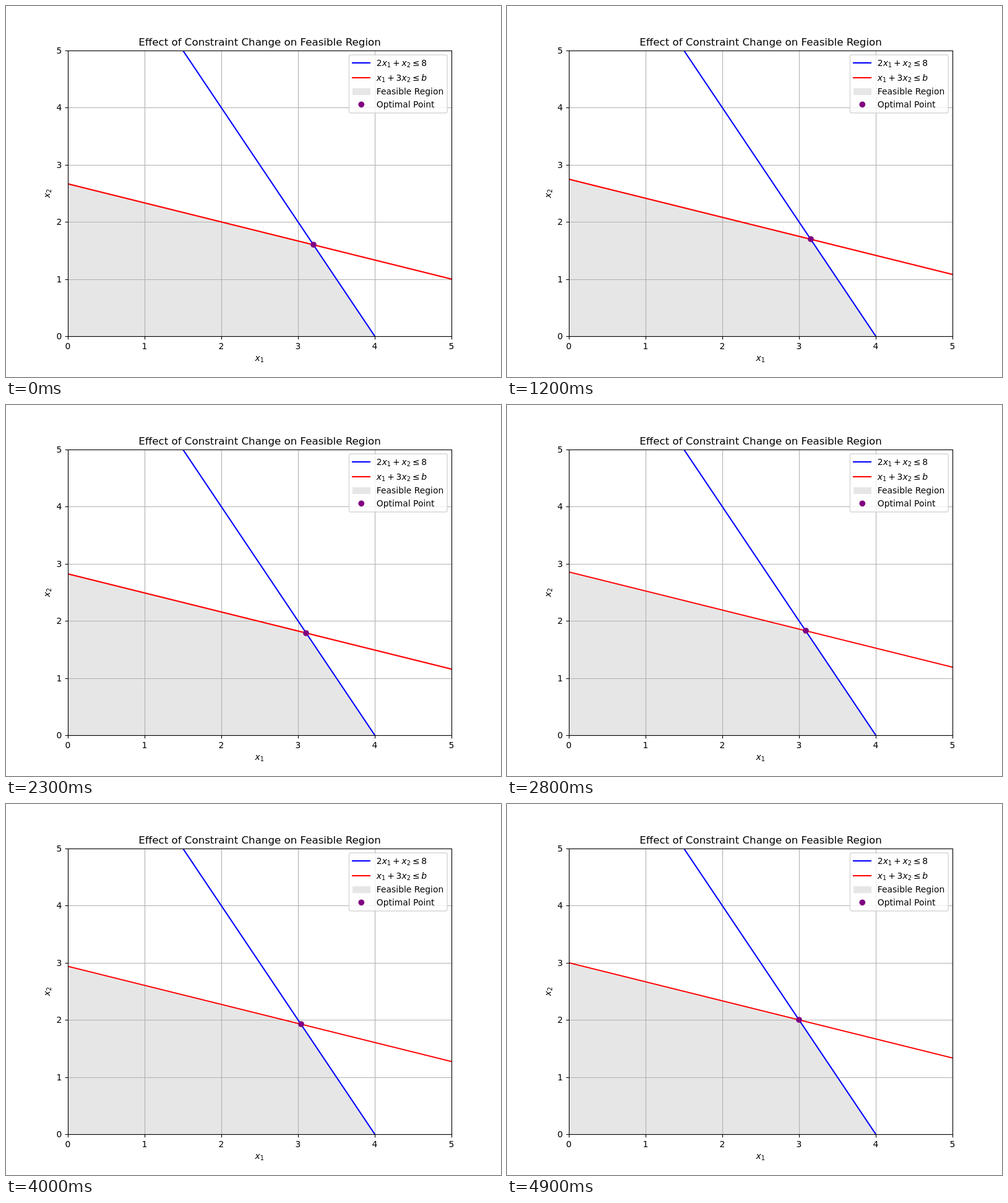
These frames come from a looping animation (800 px wide and 600 px high, 5 s). An HTML page with a canvas:

```html
<!DOCTYPE html>
<html lang="en">
<head>
<meta charset="utf-8">
<title>Feasible Region</title>
<style>
html, body { margin: 0; width: 100%; height: 100%; overflow: hidden; background: #fff; }
canvas { display: block; }
</style>
</head>
<body>
<canvas id="stage" width="800" height="600"></canvas>
<script>
const ctx = document.getElementById('stage').getContext('2d');
const FONT = '"DejaVu Sans", sans-serif';
const PT = 100 / 72, SIZE = 10 * PT;
const STEPS = 50, STEP_MS = 100;
const X = v => 100 + 124 * v;
const Y = v => 534 - 92.4 * v;
const snap = v => Math.round(v) + 0.5;

function path(points) {
  ctx.beginPath();
  for (const [x, y] of points) ctx.lineTo(x, y);
}

function line(color, width, ...points) {
  path(points);
  ctx.strokeStyle = color;
  ctx.lineWidth = width * PT;
  ctx.stroke();
}

function dot(x, y) {
  ctx.beginPath();
  ctx.arc(x, y, 3.5 * PT, 0, 2 * Math.PI);
  ctx.fillStyle = 'purple';
  ctx.fill();
}

function text(str, x, y, align = 'left', size = SIZE, style = '') {
  ctx.font = `${style} ${size}px ${FONT}`;
  ctx.textAlign = align;
  ctx.fillStyle = '#000';
  ctx.fillText(str, x, y);
}

// Letters are italic, "_" lowers the next digit, operators get side gaps.
function math(src, x, y) {
  for (const part of src.match(/_?./g)) {
    const sub = part[0] === '_';
    const gap = '+≤'.includes(part) ? 2.7 : 0;
    text(sub ? part[1] : part, x + gap, y + (sub ? 2.3 : 0), 'left',
      sub ? SIZE * 0.7 : SIZE, /[a-z]/.test(part) ? 'italic' : '');
    x += ctx.measureText(sub ? part[1] : part).width + 2 * gap + (sub ? 0.4 : 0);
  }
}

function axes() {
  ctx.strokeStyle = '#000';
  ctx.lineWidth = 0.8 * PT;
  ctx.strokeRect(100.5, 72.5, 620, 462);
  for (let v = 0; v <= 5; v++) {
    const x = snap(X(v)), y = snap(Y(v));
    line('#000', 0.8, [x, 534.5], [x, 539.4]);
    line('#000', 0.8, [100.5, y], [95.6, y]);
    text(v, X(v), 555, 'center');
    text(v, 90.3, Math.round(Y(v)) + 5, 'right');
  }
  text('Effect of Constraint Change on Feasible Region', 410, 64, 'center', 12 * PT);
  math('x_1', 402.6, 574);
  ctx.save();
  ctx.translate(71, 310.4);
  ctx.rotate(-Math.PI / 2);
  math('x_2', 0, 0);
  ctx.restore();
}

function legend() {
  ctx.beginPath();
  ctx.roundRect(554.4, 79, 158.8, 94, 2.8);
  ctx.fillStyle = 'rgba(255,255,255,0.8)';
  ctx.fill();
  ctx.strokeStyle = 'rgba(204,204,204,0.8)';
  ctx.lineWidth = PT;
  ctx.stroke();
  line('blue', 1.5, [559, 92], [589, 92]);
  line('red', 1.5, [559, 116], [589, 116]);
  ctx.fillStyle = '#e6e6e6';
  ctx.fillRect(560, 133, 29, 11);
  dot(574.3, 159.3);
  math('2x_1+x_2≤8', 598.8, 97);
  math('x_1+3x_2≤b', 598.8, 121);
  text('Feasible Region', 598.8, 143);
  text('Optimal Point', 598.8, 164);
}

function draw(b) {
  const best = [X((24 - b) / 5), Y((2 * b - 8) / 5)];
  ctx.fillStyle = '#fff';
  ctx.fillRect(0, 0, 800, 600);

  ctx.save();
  ctx.beginPath();
  ctx.rect(100, 72, 620, 462);
  ctx.clip();
  path([[X(0), Y(0)], [X(0), Y(b / 3)], best, [X(4), Y(0)]]);
  ctx.fillStyle = '#e6e6e6';
  ctx.fill();
  for (let v = 0; v <= 5; v++) {
    line('#b0b0b0', 0.8, [snap(X(v)), 72], [snap(X(v)), 534]);
    line('#b0b0b0', 0.8, [100, snap(Y(v))], [720, snap(Y(v))]);
  }
  line('blue', 1.5, [X(0), Y(8)], [X(5), Y(-2)]);
  line('red', 1.5, [X(-1), Y((b + 1) / 3)], [X(6), Y((b - 6) / 3)]);
  dot(...best.map(Math.round));
  ctx.restore();

  axes();
  legend();
}

function tick() {
  const step = Math.floor(performance.now() / STEP_MS) % STEPS;
  draw(8 + step / (STEPS - 1));
  requestAnimationFrame(tick);
}
tick();
</script>
</body>
</html>
```
